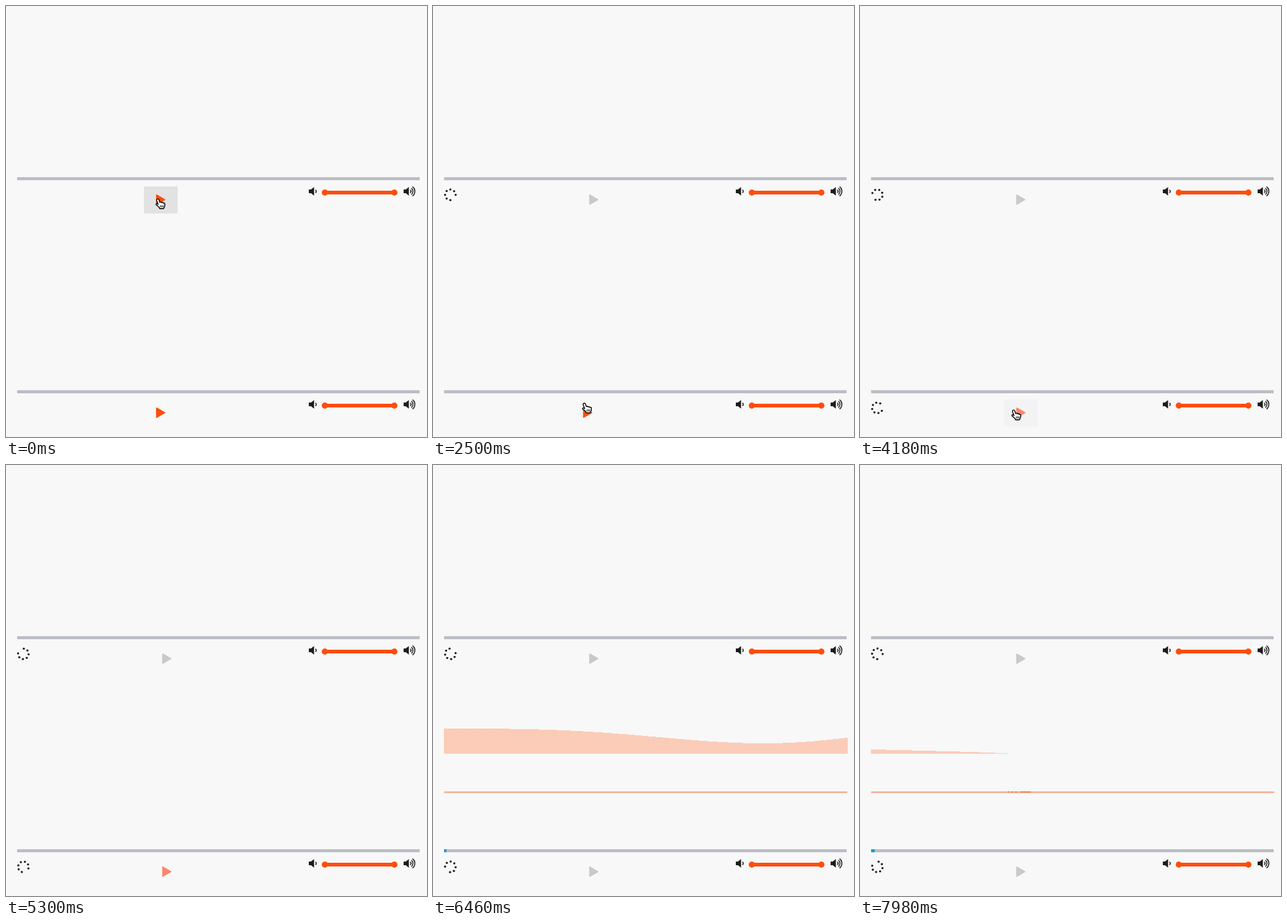
An HTML page with a canvas that plays this animation: 684 by 700 pixels, repeating every 8 s.

```html
<!DOCTYPE html>
<html lang="en">
<head>
<meta charset="utf-8">
<title>Two audio players</title>
<style>
  html, body { margin: 0; width: 100%; height: 100%; overflow: hidden; background: #f8f8f8; }
  canvas { display: block; }
</style>
</head>
<body>
<canvas id="stage" width="684" height="700"></canvas>
<script>
const ctx = document.getElementById('stage').getContext('2d');
const LOOP = 8000, WAVE_START = 5700, CURSOR_GONE = 5020;
const PAPER = '#f8f8f8', INK = '#1c1c1c', TRACK = '#bcbec5', DISABLED = '#c9c9c9';
const ORANGE = '#ff4d0d', FADED = '#fb866c', HOVER = '#e2e2e2', HOVER_LOADING = '#f3f3f3';

// Event times in ms for each player; y is the offset of its controls.
const players = [
  { y: 0, hoverFrom: 0, hoverTo: 1300, click: 810, disabled: 1800, spinStart: -120 },
  { y: 346, hoverFrom: 2520, hoverTo: 4800, click: 3200, disabled: 5700, spinStart: 72 }
];
const cursorStops = [
  { t: 1040, x: 248, y: 314 },
  { t: 1240, x: 255, y: 398 },
  { t: 2400, x: 247, y: 645 },
  { t: 4180, x: 251, y: 657 },
  { t: 4900, x: 253, y: 673 }
];

const clamp = v => Math.max(0, Math.min(1, v));
const mix = (a, b, k) => a + (b - a) * k;

function rect(x, y, w, h, color) {
  ctx.fillStyle = color;
  ctx.fillRect(x, y, w, h);
}

function dot(x, y, r, color) {
  ctx.fillStyle = color;
  ctx.beginPath();
  ctx.arc(x, y, r, 0, Math.PI * 2);
  ctx.fill();
}

function speaker(x, y, arcs) {
  ctx.fillStyle = ctx.strokeStyle = INK;
  ctx.fill(new Path2D(`M${x} ${y - 3}h3.5l5-4v14l-5-4h-3.5z`));
  ctx.lineWidth = 1.6;
  for (let i = 0; i < arcs; i++) {
    ctx.beginPath();
    ctx.arc(x + 9, y, 3 + i * 3.2, -0.95, 0.95);
    ctx.stroke();
  }
}

function volume() {
  speaker(492, 301, 1);
  speaker(646, 301, 3);
  rect(518, 300, 113, 6, ORANGE);
  dot(518, 303, 5, ORANGE);
  dot(631, 303, 5, ORANGE);
}

// A ring of eight places with one left empty.
function spinner(degrees) {
  for (let i = 1; i < 8; i++) {
    const a = (degrees + i * 45) * Math.PI / 180;
    dot(28.2 + 8.6 * Math.cos(a), 306.7 + 8.6 * Math.sin(a), 1.75, INK);
  }
}

function playButton(player, t) {
  const loading = t >= player.click;
  const disabled = t >= player.disabled;
  const x = loading ? 10 : 0;
  if (t >= player.hoverFrom && t < player.hoverTo) {
    rect(224 + x, 293, 55, 44, loading ? HOVER_LOADING : HOVER);
  }
  ctx.fillStyle = ctx.strokeStyle = disabled ? DISABLED : loading ? FADED : ORANGE;
  ctx.lineWidth = 2;
  ctx.lineJoin = 'round';
  const shape = new Path2D(`M${244.8 + x} 307v15l13-7.5z`);
  ctx.fill(shape);
  ctx.stroke(shape);
}

function drawPlayer(player, t) {
  ctx.save();
  ctx.translate(0, player.y);
  rect(18, 278, 654, 5, TRACK);
  volume();
  playButton(player, t);
  if (t >= player.click) spinner(player.spinStart + t * 0.066);
  ctx.restore();
}

const loudHeight = u => 29 + 12 * Math.cos(Math.PI * (u / 0.79) ** 1.5);
const quietHeight = u => 7 * clamp(1 - u / 0.345) ** 0.7;

function drawWave(t) {
  if (t < WAVE_START) return;
  const rise = clamp((t - WAVE_START) / 400);
  const fade = clamp((t - 6560) / 1400);
  for (let x = 18; x < 673; x += 2) {
    const u = (x - 18) / 655;
    const h = Math.round(rise * mix(loudHeight(u), quietHeight(u), fade));
    rect(x, 469 - h, 1, h, '#fbb598');
    rect(x + 1, 469 - h, 1, h, '#fae3d8');
  }
  rect(18, 530, 655, 3, '#f9b59c');
  if (fade === 1) {
    for (let x = 240; x < 256; x += 6) rect(x, 530, 3, 2, '#ec8658');
    rect(260, 530, 17, 2, '#ec8658');
  }
  rect(18, 624, Math.round(3 + (t - WAVE_START) * 0.00135), 5, '#169fd8');
}

const arrow = new Path2D('M0 0v14l3.2-3 2.3 5.4 2.6-1.1-2.3-5.3h4.5z');
const hand = new Path2D('M1 1.2C2-.2 3.9.3 4.4 1.8L6 6.2C6.8 5 8.4 5.3 8.8 6.6 9.8 5.6 11.2 6 11.5 7.3 12.7 6.6 14 7.3 14 8.8L13.7 12.5 12 16H5.8L4.5 13.4 0 9.8C-.8 8.5.8 7.5 2 8.3L3.3 9.4 1 3.2Q.6 2 1 1.2Z');
const fingers = new Path2D('M7 10.5v3.5M9.2 10.5v3.5M11.3 10.5v3.5');

function cursorAt(t) {
  const next = cursorStops.findIndex(stop => stop.t > t);
  if (next === 0) return cursorStops[0];
  if (next < 0) return cursorStops.at(-1);
  const a = cursorStops[next - 1], b = cursorStops[next];
  const k = (t - a.t) / (b.t - a.t);
  return { x: mix(a.x, b.x, k), y: mix(a.y, b.y, k) };
}

function drawCursor(t) {
  if (t >= CURSOR_GONE) return;
  const { x, y } = cursorAt(t);
  const pointing = y < 337 || y > 638;
  const shape = pointing ? hand : arrow;
  ctx.save();
  ctx.translate(pointing ? x - 4 : x, pointing ? y - 1 : y);
  ctx.lineJoin = 'round';
  ctx.lineWidth = 1.3;
  ctx.fillStyle = pointing ? '#fff' : '#000';
  ctx.strokeStyle = pointing ? '#000' : '#fff';
  ctx.stroke(shape);
  ctx.fill(shape);
  if (pointing) {
    ctx.stroke(shape);
    ctx.lineWidth = 1;
    ctx.stroke(fingers);
  }
  ctx.restore();
}

function tick() {
  const t = performance.now() % LOOP;
  rect(0, 0, 684, 700, PAPER);
  players.forEach(player => drawPlayer(player, t));
  drawWave(t);
  drawCursor(t);
  requestAnimationFrame(tick);
}
tick();
</script>
</body>
</html>
```
